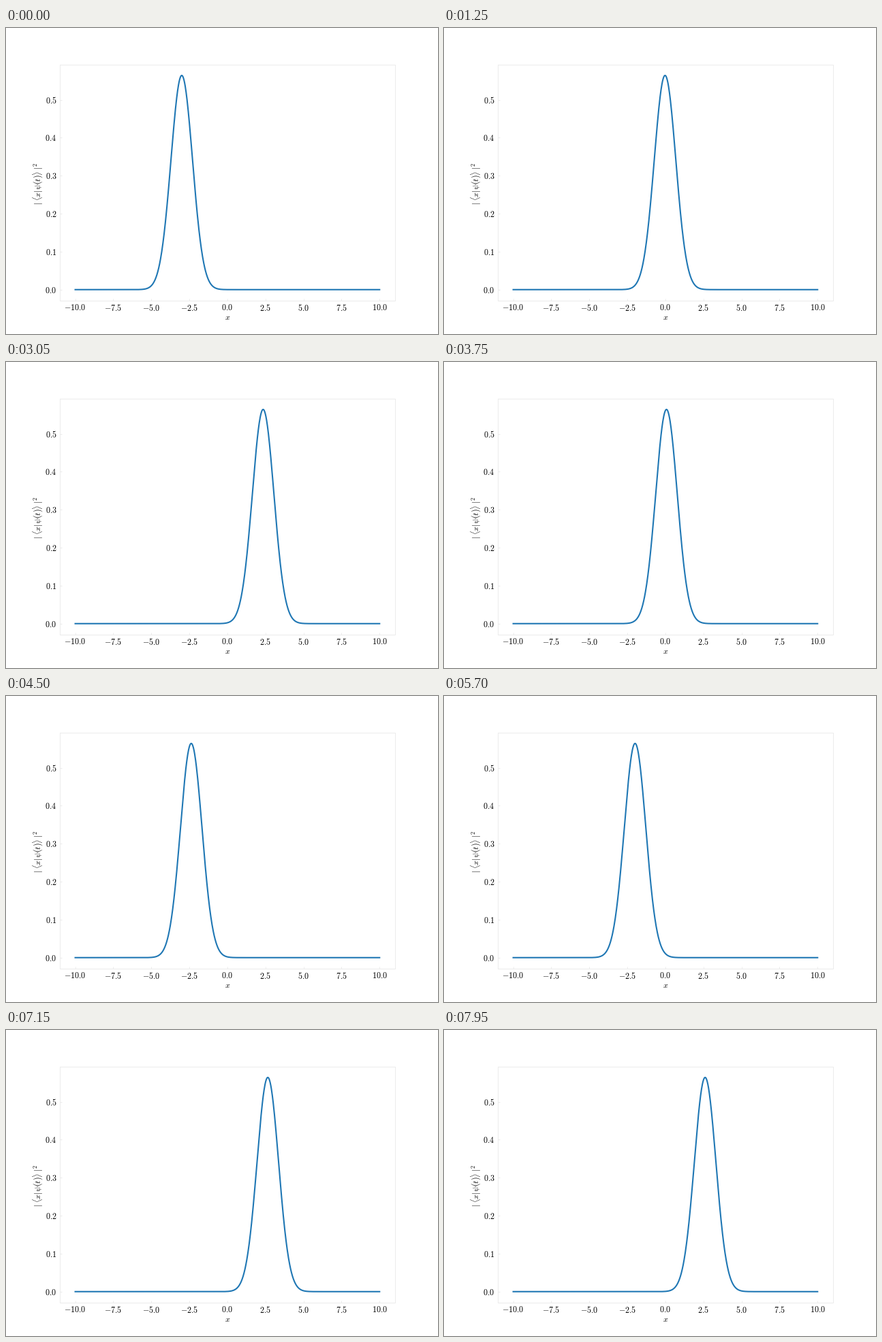
A matplotlib script that plays this animation: 634 px wide and 450 px high, repeating every 8000 ms.

```python
import numpy as np
import matplotlib.pyplot as plt
from matplotlib.animation import FuncAnimation

FRAMES, STEP_MS = 160, 50
PERIOD = 100.5            # frames per oscillation
START = -3.0
PEAK = 1 / np.sqrt(np.pi)
FAINT = "#ebebeb"

plt.rcParams.update({"mathtext.fontset": "cm", "font.size": 8.7})

fig = plt.figure(figsize=(6.34, 4.5), dpi=100, facecolor="white")
ax = fig.add_axes([0.125, 0.11, 0.775, 0.77])
ax.set_xlim(-11, 11)
ax.set_ylim(-0.05 * PEAK, 1.05 * PEAK)

for spine in ax.spines.values():
    spine.set(color=FAINT, linewidth=0.72)

xticks = np.arange(-10, 10.1, 2.5)
yticks = np.arange(6) / 10
ax.set_xticks(xticks, [f"${v:.1f}$" for v in xticks])
ax.set_yticks(yticks, [f"${v:.1f}$" for v in yticks])
ax.tick_params(direction="in", length=2.5, width=0.72, pad=3.5,
               color=FAINT, labelcolor="black")


def label(px, py, text, **kw):
    fig.text(px / 634, 1 - py / 450, text, ha="center", va="center", **kw)


label(325, 425.5, "$x$")
label(47.5, 228.5, r"$|\;\langle x|\psi(t)\rangle\;|^2$", rotation=90)

x = np.linspace(-10, 10, 1000)
curve, = ax.plot(x, np.zeros_like(x), color="#1f77b4", linewidth=1.5)


def draw(i):
    center = START * np.cos(2 * np.pi * i / PERIOD)
    curve.set_ydata(PEAK * np.exp(-(x - center) ** 2))
    return curve,


anim = FuncAnimation(fig, draw, frames=FRAMES, interval=STEP_MS,
                     repeat=True, repeat_delay=0, blit=False)
plt.show()
```
